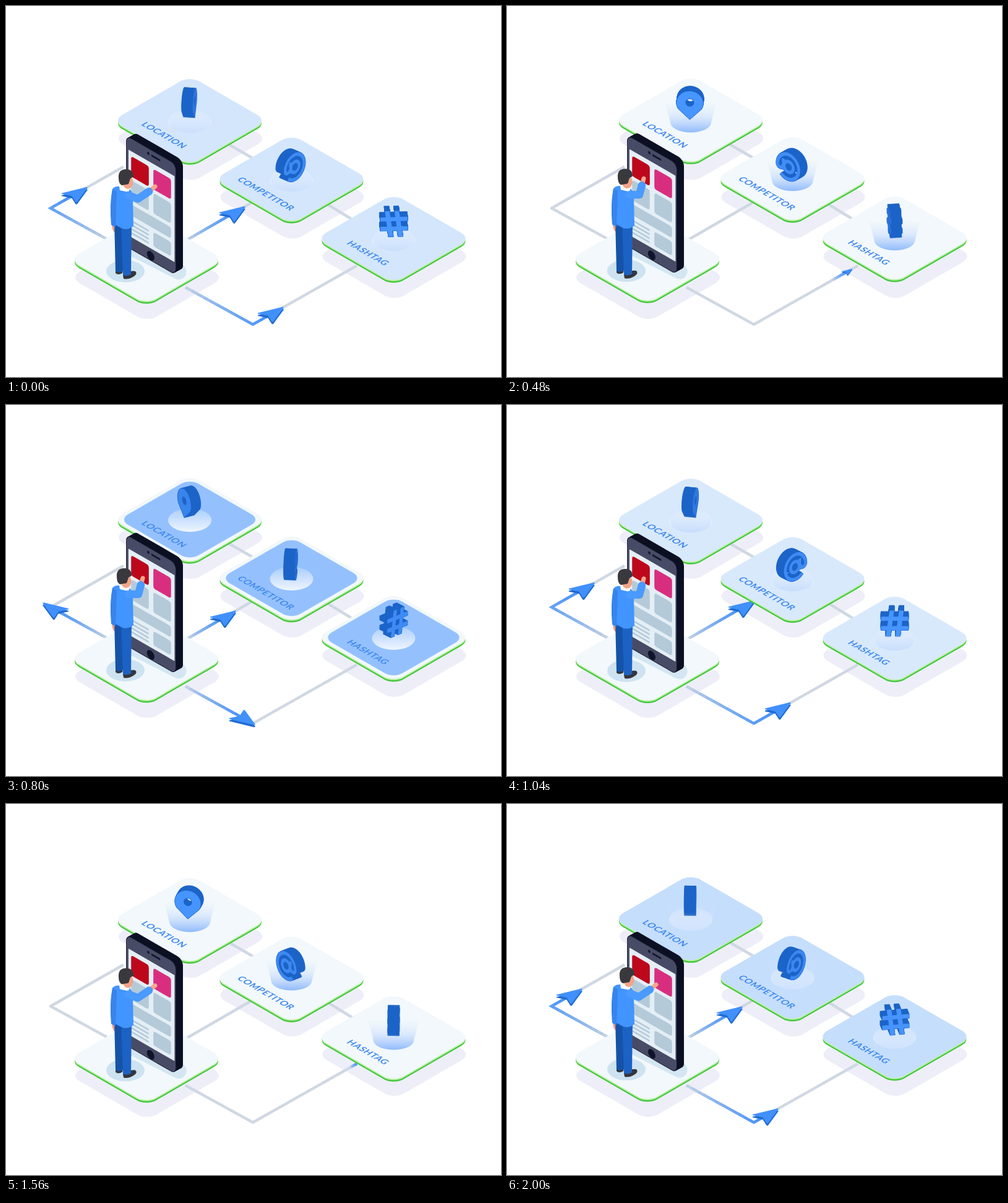
An HTML page with a canvas for the animation above (2.04 s loop, 800x600 px).

```html
<!DOCTYPE html>
<html lang="en">
<head>
<meta charset="utf-8">
<title>Isometric search flow</title>
<style>
  html, body { margin: 0; width: 100%; height: 100%; overflow: hidden; background: #fff; }
  svg, canvas { position: absolute; left: 0; top: 0; width: 800px; height: 600px; }
  .label { font: 700 14.5px Lato, sans-serif; letter-spacing: .6px; fill: #3f88ef; text-anchor: middle; }
  .line { fill: none; stroke: #cfd8e3; stroke-width: 4.5; }
</style>
</head>
<body>
<svg id="scene" viewBox="0 0 800 600"></svg>
<canvas id="icons" width="800" height="600"></canvas>
<script>
const LOOP = 2040, HALF = LOOP / 2, STEP = 40;
const ISO = '.866 .5 -.866 .5';
const BLUE = [64, 144, 251], GRAY = [207, 216, 227];
const PIECES = 14;

const lerp = (a, b, k) => a + (b - a) * k;
const mix = (a, b, k) => `rgb(${a.map((v, i) => Math.round(lerp(v, b[i], k)))})`;

// Piecewise linear value of [time, value] pairs
function at(keys, t) {
  if (t <= keys[0][0]) return keys[0][1];
  for (let i = 1; i < keys.length; i++) {
    const [t0, v0] = keys[i - 1], [t1, v1] = keys[i];
    if (t <= t1) return lerp(v0, v1, (t - t0) / (t1 - t0));
  }
  return keys[keys.length - 1][1];
}

/* ---------- scene ---------- */

const plates = [
  { x: 297, y: 185.3, label: 'LOCATION' },
  { x: 461.5, y: 280, label: 'COMPETITOR' },
  { x: 626.5, y: 376, label: 'HASHTAG' }
];
const base = { x: 227, y: 410 };

const routes = [
  { pts: [[163, 377], [72, 327], [190, 260]], shrink: 30, runs: [
    [[560, 0], [800, 84], [1040, 141], [1312, 209]],
    [[1600, 0], [1840, 84], [2000, 121], [2040, 131], [2352, 209]]] },
  { pts: [[293, 378], [397, 318]], shrink: 12, runs: [
    [[560, 0], [800, 59], [1040, 87], [1160, 104]],
    [[1640, 0], [1840, 44], [2000, 68], [2040, 74], [2240, 104]]] },
  { pts: [[290, 455], [399, 515], [567, 420]], shrink: 42, runs: [
    [[560, 0], [800, 93], [1040, 149], [1540, 277]],
    [[1600, 0], [1840, 93], [2000, 129], [2040, 139], [2520, 260], [2560, 277]]] }
];
for (const r of routes) {
  r.total = r.pts.slice(1).reduce((sum, p, i) => sum + Math.abs(p[0] - r.pts[i][0]), 0);
  r.d = 'M' + r.pts.join('L');
}

const tile = (x, y, fill, dy = 0, extra = '') =>
  `<rect x="-72.2" y="-72.2" width="144.4" height="144.4" rx="18" fill="${fill}" transform="matrix(${ISO} ${x} ${y + dy})" ${extra}/>`;

const slab = ({ x, y }) =>
  tile(x, y, '#45c83f', 4.5) + tile(x, y, '#b9efa2', 2) + tile(x, y, '#f2f8fb');

const plate = p => `
  ${slab(p)}
  <g transform="translate(${p.x} ${p.y})">
    <g class="pulse">${tile(0, 0, '#8fbfff')}</g>
    <ellipse class="disc" cy="1" rx="35" ry="19" fill="url(#disc)"/>
    <path class="cone" d="M-41 -29L-33 4A33 16 0 0 0 33 4L41 -29Z" fill="url(#cone)"/>
    <text class="label" y="52.7" transform="matrix(${ISO} 0 0)">${p.label}</text>
  </g>`;

const box = (x, y, w, h, fill, r = 4) =>
  `<rect x="${x}" y="${y}" width="${w}" height="${h}" rx="${r}" fill="${fill}"/>`;

function phone() {
  const tone = '#b4cad9';
  let depth = '';
  for (let i = 11; i > 0; i--)
    depth += `<g transform="matrix(.866 .5 0 1 ${194 + i} ${209 - i * .55})">${box(0, 0, 93.5, 180, '#0c1023', 10)}</g>`;
  const lines = [132, 138.5, 145, 151.5].map(y => box(9.5, y, 33, 3, tone, 1.5)).join('');
  return `
    <path d="M208 394L279 430" stroke="#d3e6f2" stroke-width="25" stroke-linecap="round"/>
    ${depth}
    <g transform="matrix(.866 .5 0 1 194 209)">
      ${box(0, 0, 93.5, 180, '#15182c', 10)}
      ${box(.8, 1, 91.7, 178, '#484b65', 9)}
      ${box(4.5, 21, 86, 139, '#e4eef5', 1)}
      <circle cx="41.6" cy="8.5" r="2.2" fill="#10142a"/>
      ${box(47, 7.5, 17, 3, '#10142a', 1.5)}
      <circle cx="46" cy="172" r="7" fill="#10142a"/>
      ${box(9.5, 29, 33, 33, '#bd081c')}
      ${box(51, 29, 33, 33, '#d92e7f')}
      ${box(9.5, 68, 33, 33, tone)}
      ${box(51, 68, 33, 33, tone)}
      ${box(9.5, 107, 74.5, 18, tone)}
      ${lines}
      ${box(51, 131, 33, 23, tone)}
    </g>`;
}

const man = `
  <ellipse cx="193" cy="429" rx="31" ry="18" fill="#cde3f2"/>
  <path d="M177 427L189 426L188 432Q181 436 177 432Z" fill="#35363c"/>
  <path d="M189 435Q200 427 209 429Q213 433 207 437Q198 443 190 441Z" fill="#35363c"/>
  <path d="M171 353L178 356L177 366Q172 367 171 353Z" fill="#ef9d86"/>
  <path d="M175 348L190 350L189 428Q183 433 177 429Z" fill="#1553a8"/>
  <path d="M186 352L203 354L202 434Q195 438 189 435Z" fill="#1b62c4"/>
  <path d="M172 296Q176 291 184 292L198 295Q206 300 205 312L206 356Q196 364 186 359L171 351Q167 322 172 296Z" fill="#4294fe"/>
  <path d="M172 296Q167 322 170 354L177 358L179 300Z" fill="#3784ee"/>
  <path d="M183 291L200 295L198 301L184 298Z" fill="#fff"/>
  <g id="head">
    <ellipse cx="197" cy="285" rx="8.5" ry="11" fill="#f2a488"/>
    <path d="M182 278Q181 264 194 264Q206 264 206 276L201 279L198 288L187 290Q182 287 182 278Z" fill="#39393d"/>
  </g>
  <path id="hand" fill="none" stroke="#f5a78c" stroke-width="7" stroke-linecap="round"/>
  <path id="arm" fill="none" stroke="#4a9aff" stroke-width="12.5" stroke-linecap="round" stroke-linejoin="round"/>`;

const dart = 'M0 -21L13 11L0 5L-13 11Z';
const dartLayer = (dy, color) =>
  `<g transform="matrix(${ISO} 0 ${dy})"><path class="dart" d="${dart}" fill="${color}" stroke="${color}" stroke-width="2.5" stroke-linejoin="round"/></g>`;

const scene = document.getElementById('scene');
scene.innerHTML = `
  <defs>
    <linearGradient id="disc" x2="0" y2="1">
      <stop stop-color="#fff" stop-opacity=".2"/><stop offset="1" stop-color="#fff" stop-opacity=".85"/>
    </linearGradient>
    <linearGradient id="cone" x2="0" y2="1">
      <stop stop-color="#dceafd" stop-opacity="0"/><stop offset=".45" stop-color="#cfe1fd" stop-opacity=".6"/>
      <stop offset="1" stop-color="#8fbafc"/>
    </linearGradient>
  </defs>
  ${[...plates, base].map(p => tile(p.x + 1, p.y, '#eeeef8', 29)).join('')}
  <path class="line" d="M355 221L402 248M515 318L564 348"/>
  ${routes.map(r => `<path class="line" d="${r.d}" stroke-linejoin="round"/>`).join('')}
  ${routes.map(r => `<g class="trail">${`<path class="line" d="${r.d}" pathLength="${r.total}"/>`.repeat(PIECES)}</g>`).join('')}
  ${routes.map(() => `<g class="arrow">${dartLayer(3.5, '#1f6bd0')}${dartLayer(0, '#4190fb')}</g>`).join('')}
  <g id="float">${plates.map(plate).join('')}${slab(base)}${phone()}${man}</g>`;

const all = s => [...scene.querySelectorAll(s)];
const [floating] = all('#float'), [head] = all('#head'), [arm] = all('#arm'), [hand] = all('#hand');
const pulses = all('.pulse'), discs = all('.disc'), cones = all('.cone');
all('.trail').forEach((g, i) => routes[i].trail = [...g.children]);
all('.arrow').forEach((g, i) => {
  routes[i].arrow = g;
  routes[i].darts = [...g.querySelectorAll('.dart')];
});

/* ---------- arrows ---------- */

function place(r, dist) {
  for (let i = 1; i < r.pts.length; i++) {
    const [x0, y0] = r.pts[i - 1], [x1, y1] = r.pts[i], len = Math.abs(x1 - x0);
    if (dist <= len || i === r.pts.length - 1) {
      const k = Math.min(1, dist / len);
      return { x: lerp(x0, x1, k), y: lerp(y0, y1, k), turn: x1 < x0 ? -90 : y1 > y0 ? 90 : 0 };
    }
    dist -= len;
  }
}

function drawRoute(r, time) {
  let headAt = 0, tailAt = 0, live = false;
  r.runs.forEach((keys, i) => {
    const end = keys[keys.length - 1][0] + 40;
    for (const t of [time, time + LOOP]) {
      if (t <= keys[0][0] || t >= end) continue;
      live = true;
      headAt = at(keys, t);
      tailAt = at([[1060 + i * 1000, 0], [end, r.total]], t);
    }
  });
  const size = live ? Math.min(1, headAt / 35, (r.total - headAt) / r.shrink) : 0;
  const { x, y, turn } = place(r, headAt);
  r.arrow.style.display = size > .05 ? '' : 'none';
  r.arrow.setAttribute('transform', `translate(${x} ${y}) scale(${size})`);
  r.darts.forEach(d => d.setAttribute('transform', `rotate(${turn})`));

  const len = Math.max(0, headAt - tailAt) / PIECES;
  r.trail.forEach((p, i) => {
    p.style.display = live && len > 0 ? '' : 'none';
    p.style.stroke = mix(GRAY, BLUE, Math.pow((i + .5) / PIECES, .7));
    p.setAttribute('stroke-dasharray', `0 ${tailAt + i * len} ${len + .3} 9999`);
  });
}

/* ---------- turning icons ---------- */

const ctx = document.getElementById('icons').getContext('2d');
const RISE = .9, TILT = .45, DEPTH = 18;

function band(cx, cy, outer, inner, from, to) {
  const pts = [], n = 36;
  const arc = (r, a, b) => {
    for (let i = 0; i <= n; i++) {
      const w = lerp(a, b, i / n) * Math.PI / 180;
      pts.push([cx + r * Math.cos(w), cy + r * Math.sin(w)]);
    }
  };
  arc(outer, from, to);
  if (inner) arc(inner, to, from);
  return pts;
}
const bar = (u, v, w, h, lean = 0) =>
  [[u - w - lean, v - h], [u + w - lean, v - h], [u + w + lean, v + h], [u - w + lean, v + h]];

// The pin has its hole wound the other way round
const pin = [
  [[0, -29], ...band(0, 0, 21.5, 0, -28, 208)],
  band(0, 1, 7, 0, 360, 0)
];
const atSign = [
  band(0, 0, 25, 19, 0, 312),
  band(-1, 0, 12.5, 6.5, 0, 360),
  bar(9.5, 2, 3, 10, .8),
  band(16.5, 0, 8.5, 2.5, 180, 360)
];
const hash = [bar(-7.5, 0, 3.8, 23, 3), bar(8, 0, 3.8, 23, 3), bar(0, 8.5, 22, 3.7), bar(0, -8.5, 22, 3.7)];

const icons = [
  { shape: pin, x: 296, y: 154, front: 11.5 },
  { shape: atSign, x: 460, y: 257.7, front: 32 },
  { shape: hash, x: 626.5, y: 348.3, front: 26 }
];

function drawIcon({ shape, x, y, front }, time, bob) {
  const angle = -(time - front * STEP) / LOOP * 2 * Math.PI;
  const c = Math.cos(angle), s = Math.sin(angle), near = c < 0 ? -1 : 1;
  const trace = d => {
    ctx.beginPath();
    for (const part of shape) {
      part.forEach(([u, v], i) => {
        const px = x + u * c + d * s;
        const py = y + bob - v * RISE + (d * c - u * s) * TILT;
        i ? ctx.lineTo(px, py) : ctx.moveTo(px, py);
      });
      ctx.closePath();
    }
  };
  ctx.lineWidth = 1.2;
  ctx.lineJoin = 'round';
  ctx.fillStyle = ctx.strokeStyle = '#1c64c8';
  for (let i = 0; i <= DEPTH; i++) {
    trace(near * (i - DEPTH / 2));
    ctx.fill();
    ctx.stroke();
  }
  trace(near * DEPTH / 2);
  ctx.fillStyle = mix([42, 112, 216], [71, 149, 255], Math.abs(c));
  ctx.fill();
}

/* ---------- timeline ---------- */

// Times below are in steps of 40 ms, over half a loop
const glow = [[0, .31], [1, .2], [6, 0], [14, 0], [17, .7], [20, .95], [21, .95], [24.5, .45], [25.5, .31]];
const spread = [[0, 1], [12, 1], [13.9, 1], [14, .2], [18, .8], [20, .915], [20.5, .915], [23, 1]];
const discFade = [[0, .6], [6, .2], [14, .1], [19, 1], [22, 1], [25.5, .6]];
const coneFade = [[0, .35], [8, 1], [14, 1], [19, 0], [21, 0], [25.5, .35]];
const reach = [[120, 1], [360, 0], [1180, 0], [1420, 1]];

function draw(time) {
  const phase = time % HALF / STEP;
  const bob = .4 - 1.3 * Math.cos((time - 400) / LOOP * 2 * Math.PI);
  floating.setAttribute('transform', `translate(0 ${bob})`);

  const scale = at(spread, phase);
  pulses.forEach(p => {
    p.setAttribute('transform', `scale(${scale})`);
    p.setAttribute('opacity', at(glow, phase));
  });
  discs.forEach(d => d.setAttribute('opacity', at(discFade, phase)));
  cones.forEach(c => c.setAttribute('opacity', at(coneFade, phase)));

  const k = at(reach, time);
  const point = (x0, y0, x1, y1) => `${lerp(x0, x1, k)} ${lerp(y0, y1, k)}`;
  const wrist = point(218, 291, 231, 300);
  arm.setAttribute('d', `M198 306L${point(214, 306, 213, 312)}L${wrist}`);
  hand.setAttribute('d', `M${wrist}L${point(221, 280, 241, 292)}`);
  head.setAttribute('transform', `translate(${lerp(-3, 0, k)} 0)`);

  routes.forEach(r => drawRoute(r, time));
  ctx.clearRect(0, 0, 800, 600);
  icons.forEach(i => drawIcon(i, time, bob));
}

const start = performance.now();
function frame() {
  const t = (performance.now() - start) % LOOP;
  draw(Math.floor(t / STEP) * STEP);
  requestAnimationFrame(frame);
}
frame();
</script>
</body>
</html>
```
